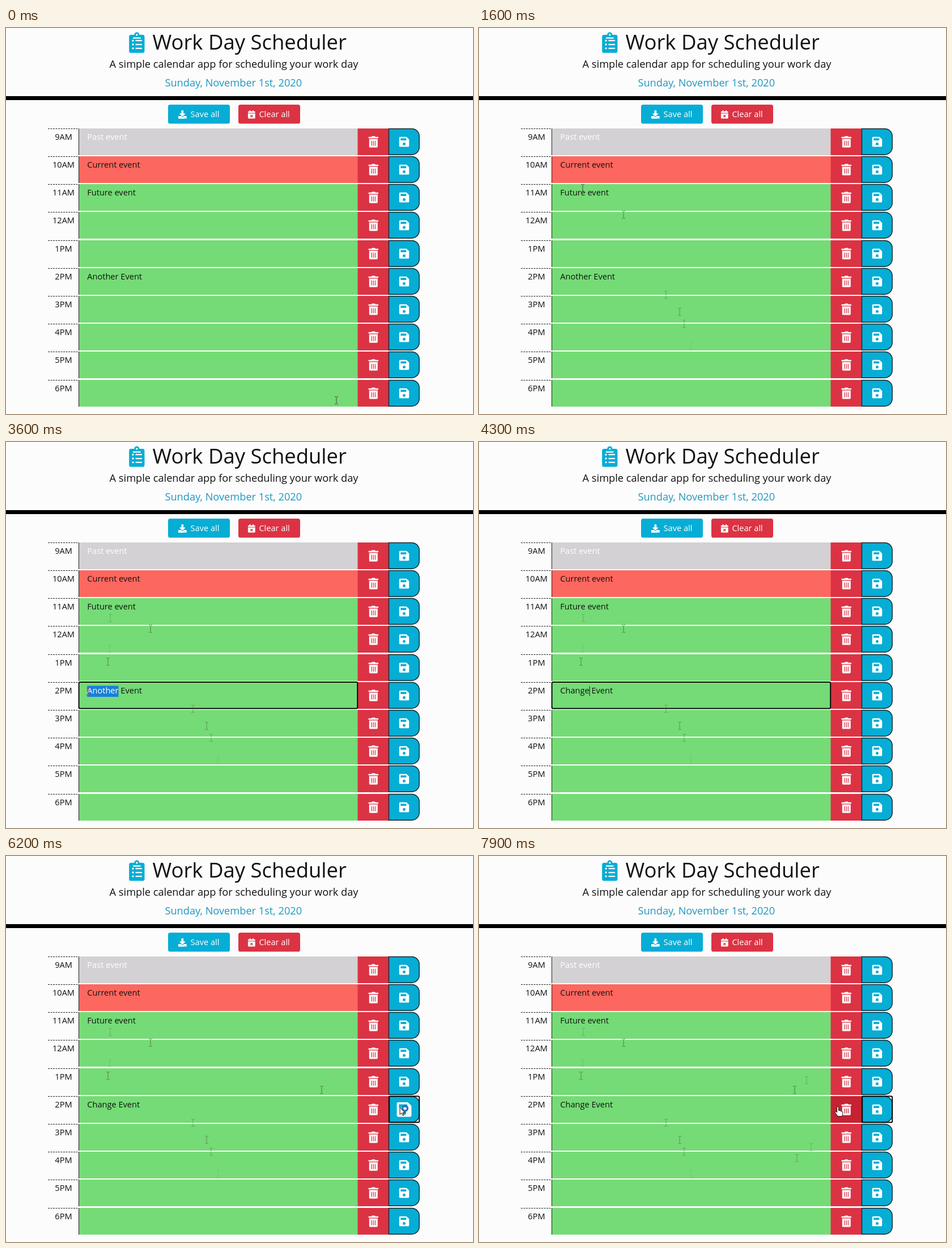
An HTML page for the animation above (8 s loop, 824 px wide and 680 px high).

```html
<!DOCTYPE html>
<html lang="en">
<head>
<meta charset="utf-8">
<title>Work Day Scheduler</title>
<style>
html, body { margin: 0; width: 100%; height: 100%; overflow: hidden; background: #fcfcfc; }
svg { display: block; font-family: "Open Sans", sans-serif; font-size: 14.58px; }
text { white-space: pre; }
</style>
</head>
<body>
<svg id="stage" width="824" height="680" viewBox="0 0 824 680"></svg>
<script>
const LOOP = 8000, STEP = 100;
const BLUE = '#06add5', RED = '#db3344', RED_HOVER = '#c62232', GREEN = '#75db76';
const stage = document.getElementById('stage');

function add(parent, tag, attrs = {}, text) {
  const node = document.createElementNS('http://www.w3.org/2000/svg', tag);
  set(node, attrs);
  if (text !== undefined) node.textContent = text;
  parent.append(node);
  return node;
}
function set(node, attrs) {
  for (const key in attrs) node.setAttribute(key, attrs[key]);
}
const show = (node, on) => node.setAttribute('visibility', on ? 'visible' : 'hidden');
const rect = (x, y, width, height, fill, more) => add(stage, 'rect', { x, y, width, height, fill, ...more });
const label = (x, y, text, more) => add(stage, 'text', { x, y, fill: '#111', ...more }, text);
const disc = (x, y, r) => `M${x - r} ${y}a${r} ${r} 0 1 0 ${2 * r} 0a${r} ${r} 0 1 0 ${-2 * r} 0z`;
const bar = (x, y, w, h) => `M${x} ${y}h${w}v${h}h${-w}z`;

// Icons live on a 512-unit-high grid.
const ICONS = {
  clipboard: 'M336 64h-80a64 64 0 0 0-128 0H48a48 48 0 0 0-48 48v352a48 48 0 0 0 48 48h288a48 48 0 0 0 48-48V112a48 48 0 0 0-48-48z'
    + disc(192, 64, 24) + [208, 304, 400].map(y => disc(96, y, 24) + bar(160, y - 16, 160, 32)).join('')
    + 'M104 128h176q8 0 8 8v16q0 8-8 8H104q-8 0-8-8v-16q0-8 8-8z',
  trash: 'M432 32H312l-9-19A24 24 0 0 0 281 0H167a24 24 0 0 0-22 13l-9 19H16A16 16 0 0 0 0 48v32a16 16 0 0 0 16 16h416a16 16 0 0 0 16-16V48a16 16 0 0 0-16-16z'
    + 'M32 128h384v336a48 48 0 0 1-48 48H80a48 48 0 0 1-48-48z' + [128, 208, 288].map(x => bar(x, 208, 32, 224)).join(''),
  save: 'M434 130 350 46a48 48 0 0 0-34-14H48A48 48 0 0 0 0 80v352a48 48 0 0 0 48 48h352a48 48 0 0 0 48-48V164a48 48 0 0 0-14-34z'
    + disc(224, 352, 64) + bar(64, 96, 256, 96),
  download: 'M216 0h80a24 24 0 0 1 24 24v168h88c18 0 27 22 14 34L270 378c-8 8-20 8-28 0L90 226c-12-12-4-34 14-34h88V24a24 24 0 0 1 24-24z'
    + 'M0 376a24 24 0 0 1 24-24h147l49 49c20 20 52 20 72 0l49-49h147a24 24 0 0 1 24 24v112a24 24 0 0 1-24 24H24a24 24 0 0 1-24-24z' + disc(376, 464, 20) + disc(440, 464, 20),
  calendar: 'M0 112a48 48 0 0 1 48-48h48V12q0-12 12-12h40q12 0 12 12v52h128V12q0-12 12-12h40q12 0 12 12v52h48a48 48 0 0 1 48 48v48H0z'
    + 'M0 192h448v272a48 48 0 0 1-48 48H48a48 48 0 0 1-48-48zM224 318l50-50 34 34-50 50 50 50-34 34-50-50-50 50-34-34 50-50-50-50 34-34z'
};
const ICON_WIDTH = { clipboard: 384, download: 512 };

function placeIcon(node, name, cx, cy, size) {
  const k = size / 512;
  set(node, { transform: `translate(${cx} ${cy}) scale(${k}) translate(${-(ICON_WIDTH[name] || 448) / 2} -256)` });
}
function icon(name, cx, cy, size, fill = '#fff') {
  const node = add(stage, 'path', { d: ICONS[name], fill, 'fill-rule': 'evenodd' });
  placeIcon(node, name, cx, cy, size);
  return node;
}

// Header
icon('clipboard', 230.8, 25.6, 36.4, BLUE);
label(258.5, 38, 'Work Day Scheduler', { 'font-size': 36.44 });
label(182.6, 70, 'A simple calendar app for scheduling your work day', { 'font-size': 18.22 });
label(280.4, 103, 'Sunday, November 1st, 2020', { 'font-size': 18.22, fill: '#1f98c0' });
rect(0, 120, 824, 7, '#000');
rect(286, 135, 109, 33.5, BLUE, { rx: 3.6 });
rect(410, 135, 109, 33.5, RED, { rx: 3.6 });
icon('download', 311.3, 152.3, 14.8);
icon('calendar', 433.3, 152.3, 14.6);
label(325.6, 157.3, 'Save all', { fill: '#fff' });
label(446.4, 157.3, 'Clear all', { fill: '#fff' });

// Schedule
const HOURS = ['9AM', '10AM', '11AM', '12AM', '1PM', '2PM', '3PM', '4PM', '5PM', '6PM'];
const EVENTS = ['Past event', 'Current event', 'Future event'];
const EDITED = 5, ROW_H = 47;
const rowTop = i => Math.round(176.8 + 49.2 * i);

const rows = HOURS.map((hour, i) => {
  const y = rowTop(i);
  add(stage, 'path', { d: `M74 ${y + .5}H129`, stroke: '#222', 'stroke-dasharray': '3 1.5' });
  label(101.5, y + 20, hour, { 'text-anchor': 'middle' });
  rect(128, y, 493, ROW_H, ['#d3d1d3', '#fc675f'][i] || GREEN);
  rect(128, y, 1, ROW_H, '#222');
  if (EVENTS[i]) label(143.3, y + 20.4, EVENTS[i], { fill: i ? '#111' : '#fff' });
  const trash = rect(620.5, y, 55, ROW_H, RED);
  icon('trash', 648.3, y + 23.6, 20);
  add(stage, 'path', {
    d: `M675.5 ${y + .5}H716a13.2 13.2 0 0 1 13.2 13.2V${y + 33}A13.2 13.2 0 0 1 716 ${y + 46.2}H675.5z`,
    fill: BLUE, stroke: '#12262c', 'stroke-width': 1.4
  });
  return { trash, save: icon('save', 702.5, y + 23.6, 20) };
});

const editY = rowTop(EDITED);
const selection = rect(143, editY + 6.5, 0, 19.5, '#1a7fd8');
const editText = label(143.3, editY + 20.4, '');
const [before, picked, after] = ['#111', '#fff', '#111'].map(fill => add(editText, 'tspan', { fill }));
const caret = rect(0, editY + 7.5, 1, 17, '#111');
const ring = { 'stroke-width': 2, stroke: '#0a0a0a', rx: 2 };
const fieldFocus = rect(128.6, editY, 491.6, 46.4, 'none', ring);
const saveFocus = rect(676.2, editY + .2, 53, 46, 'none', ring);

// Pointer route: time, x, y and the strength of the mark left behind, if any.
const ROUTE = [
  [0, 583, 656], [100, 540, 640], [200, 440, 600], [300, 374, 560, .12], [400, 362, 521, .4], [500, 354, 500, .5],
  [600, 330, 470, .4], [900, 255, 329, .65], [1400, 186, 284], [1600, 183, 282], [1700, 184, 310, .3],
  [1750, 183, 365, .15], [1800, 180, 387, .6], [2200, 164, 438], [2600, 198, 442], [3000, 198, 442], [3500, 145, 440],
  [4600, 145, 440], [4800, 557, 412, .7], [5000, 639, 417], [5300, 695, 443], [6300, 695, 443],
  [6600, 586, 513, .3], [6800, 561, 532, .4], [7000, 578, 395, .35], [7200, 562, 329], [7400, 532, 319],
  [7700, 633, 442], [8000, 633, 442]
];
const IBEAM = 'M-3 -6.5h2l1 1 1-1h2M0 -5.5v11M-3 6.5h2l1-1 1 1h2';
const iBeam = attrs => add(stage, 'path', { d: IBEAM, fill: 'none', stroke: '#3f4a42', ...attrs });
const marks = ROUTE.filter(p => p[3]).map(([time, x, y, opacity]) =>
  ({ time, node: iBeam({ transform: `translate(${x} ${y})`, opacity }) }));

const beam = iBeam();
const outlined = { fill: '#fff', stroke: '#111', 'stroke-linejoin': 'round' };
const hand = add(stage, 'path', {
  d: 'M-1.5 1.2q0-1.7 1.5-1.7t1.5 1.7v5q2.5-.6 2.5.8 2.4-.5 2.5.9 2.3-.2 2.2 1.5v3.2q0 1.5-1.2 4h-7.5q-1.2-2.6-4.4-6.2-1-1.8.6-2.2 1.2 0 2.3 1.6z',
  ...outlined
});
const busy = add(stage, 'g');
add(busy, 'circle', { cx: 9, cy: 1.5, r: 4.5, fill: 'none', stroke: '#2678b8', 'stroke-width': 3.5 });
add(busy, 'path', { d: 'M0 0v12.5l3-2.8 2 4.5 2-.9-2-4.3h4z', ...outlined });

function pointerAt(t) {
  const i = Math.max(1, ROUTE.findIndex(p => p[0] >= t));
  const [t0, x0, y0] = ROUTE[i - 1], [t1, x1, y1] = ROUTE[i];
  const k = (t - t0) / (t1 - t0);
  return [x0 + (x1 - x0) * k, y0 + (y1 - y0) * k];
}

const PRESS = 3000, TYPE_START = 3800, KEY = 100, CLICK = 5800;
const OLD = 'Another', NEW = 'Change', REST = ' Event';

function drawField(t, x) {
  const typing = t >= TYPE_START;
  const typed = NEW.slice(0, Math.floor((t - TYPE_START) / KEY) + 1);
  const dragging = t >= PRESS && !typing;
  const start = dragging ? Math.round((x - 145) / 53 * OLD.length) : OLD.length;
  before.textContent = typing ? typed : OLD.slice(0, start);
  picked.textContent = typing ? '' : OLD.slice(start);
  after.textContent = REST;
  const left = 143.3 + before.getComputedTextLength();
  set(selection, { x: left, width: picked.getComputedTextLength() });
  show(selection, dragging);
  set(caret, { x: left });
  const lastKey = TYPE_START + KEY * (NEW.length - 1);
  show(caret, typing && t < CLICK && (t < lastKey || (t - lastKey) % 1000 < 500));
  show(fieldFocus, t >= PRESS && t < CLICK);
  show(saveFocus, t >= CLICK);
}

function drawPointer(t, x, y) {
  const overButton = x > 621 && x < 730;
  const waiting = t >= CLICK + 100 && t <= 6300;
  const hidden = t >= TYPE_START && t < 4600;
  for (const node of [beam, hand, busy]) set(node, { transform: `translate(${x} ${y})` });
  set(beam, { stroke: t > PRESS && t < TYPE_START ? '#b04a40' : '#4a4644' });
  show(beam, !overButton && !hidden);
  show(hand, overButton && !waiting);
  show(busy, waiting);
  for (const { time, node } of marks) show(node, t > time);

  rows.forEach(({ trash, save }, i) => {
    const top = rowTop(i), inRow = y >= top && y < top + ROW_H;
    set(trash, { fill: inRow && x > 621 && x < 675 ? RED_HOVER : RED });
    if (i === EDITED) {
      const grow = Math.max(0, Math.min(1, (t - 5200) / 300, (6600 - t) / 300));
      placeIcon(save, 'save', 702.5, top + 23.6, 20 + 9.5 * grow);
    }
  });
}

function render(now) {
  const t = Math.floor(now % LOOP / STEP) * STEP;
  const [x, y] = pointerAt(t);
  drawField(t, x);
  drawPointer(t, x, y);
}

const began = performance.now();
function tick() {
  render(performance.now() - began);
  requestAnimationFrame(tick);
}
tick();
</script>
</body>
</html>
```
